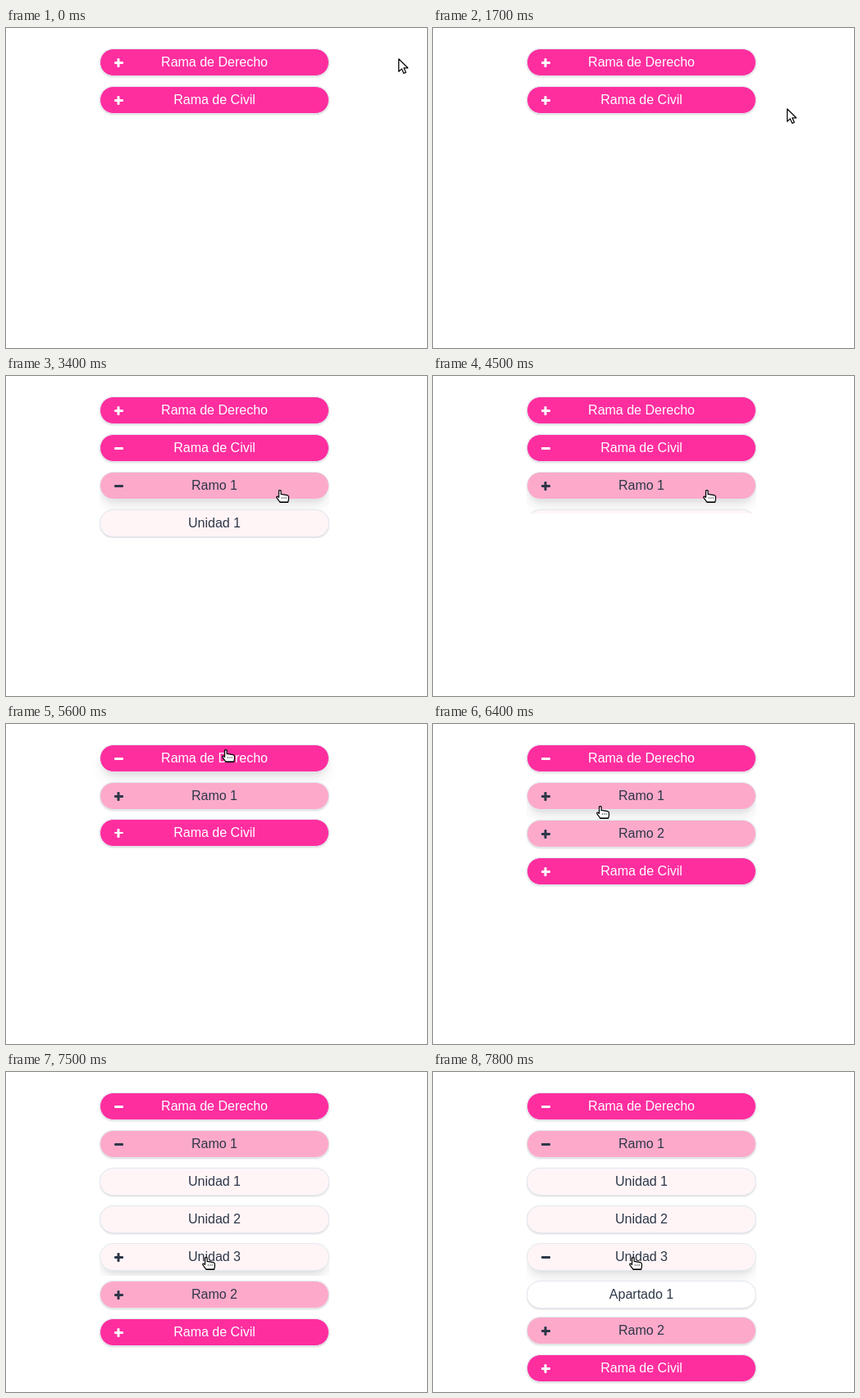
An HTML page that plays this animation: 513 by 391 pixels, repeating every 8000 ms.

```html
<!DOCTYPE html>
<html lang="es">
<head>
<meta charset="utf-8">
<style>
  html, body { margin: 0; width: 100%; height: 100%; overflow: hidden; background: #fff; }
  #menu { position: absolute; left: 114px; top: 19px; width: 280px; }
  .row { height: 46px; padding: 6px 0; box-sizing: border-box; }
  .pill {
    position: relative; height: 34px; box-sizing: border-box;
    border: 1px solid #e2e8f0; border-radius: 17px;
    font: 16px/32px "Liberation Sans", Arial, sans-serif; text-align: center; color: #2d3748;
    box-shadow: 0 1px 3px rgba(0,0,0,.1), 0 1px 2px rgba(0,0,0,.06);
  }
  .pill.hover { box-shadow: 0 10px 15px -3px rgba(0,0,0,.1), 0 4px 6px -2px rgba(0,0,0,.05); }
  .level0 { background: #ff2e9f; color: #fff; }
  .level1 { background: #fdaaca; }
  .level2 { background: #fff5f7; }
  .level3 { background: #fff; }
  .kids { overflow: hidden; }
  .icon::before, .icon::after {
    content: ""; position: absolute; left: 17px; top: 15px;
    width: 10.5px; height: 2.5px; border-radius: 1px; background: currentColor;
  }
  .icon::after { transform: rotate(90deg); }
  .icon.open::after { display: none; }
  svg { position: absolute; left: 0; top: 0; overflow: visible; }
  svg path { fill: #fff; stroke: #000; stroke-width: 1.2; stroke-linejoin: round; }
</style>
</head>
<body>
<div id="menu"></div>
<svg width="16" height="19">
  <path id="arrow" d="M.6 .8V16.2L4.2 12.9 6.8 18.4 9.3 17.2 6.8 11.8H11.7Z"/>
  <g id="hand">
    <path d="M3.5 1.6Q3.5 .6 4.8 .6T6.1 1.6V5.4L13.6 6.6Q15.4 7 15.4 8.6V12L14.6 15.3H5L.8 9.7Q.3 8 2 8.2L3.5 9.4Z"/>
    <path d="M5 15.2H14.6M7.4 9.5V10.5M9.8 9.5V10.5M12.2 9.5V10.5" stroke-width="1"/>
  </g>
</svg>
<script>
const LOOP = 8000, STEP = 100;
const $ = id => document.getElementById(id);

// The screen only refreshes inside these spans.
const spans = [[600, 900], [1700, 2000], [2200, 2400], [2800, 3600],
               [4300, 5100], [5200, 5700], [5900, 6600], [7000, 7800]];

// Pointer moves: start, end, x, y
const moves = [
  [500, 800, 452, 103], [800, 900, 444, 100], [1600, 2000, 356, 89], [2700, 3100, 334, 139],
  [4550, 4750, 300, 94], [5150, 5500, 268, 31], [5800, 6400, 204, 100], [7000, 7500, 244, 226]
];

const item = (label, kids = [], open = Infinity, close = Infinity, span = 300) =>
  ({ label, kids, open, close, span });

const units = () => [
  item("Unidad 1"), item("Unidad 2"),
  item("Unidad 3", [item("Apartado 1")], 7540)
];

const tree = [
  item("Rama de Derecho", [
    item("Ramo 1", units(), 6400, Infinity, 270),
    item("Ramo 2", units())
  ], 5453),
  item("Rama de Civil", [item("Ramo 1", units(), 3290, 4255)], 2150, 4800)
];
// Only the first branch reaches the last level.
tree[1].kids[0].kids[2].open = Infinity;

function add(parent, className, text = "") {
  const el = document.createElement("div");
  el.className = className;
  el.textContent = text;
  return parent.appendChild(el);
}

function build(items, parent, level = 0) {
  for (const it of items) {
    it.pill = add(add(parent, "row"), "pill level" + level, it.label);
    if (!it.kids.length) continue;
    it.icon = add(it.pill, "icon");
    it.box = add(parent, "kids");
    build(it.kids, it.box, level + 1);
  }
}

const ease = (t, start, span) =>
  0.5 - Math.cos(Math.PI * Math.min(1, Math.max(0, (t - start) / span))) / 2;

function shownTime(t) {
  t = Math.floor(t / STEP) * STEP;
  let shown = 0;
  for (const [from, to] of spans) if (t >= from) shown = Math.min(t, to);
  return shown;
}

function pointerAt(t) {
  let x = 478, y = 37;
  for (const [from, to, nx, ny] of moves) {
    const p = ease(t, from, to - from);
    x += (nx - x) * p;
    y += (ny - y) * p;
  }
  return { x, y, over: false };
}

// Lays out one list from `top`, visible down to `limit`, and returns its full height.
function layout(items, t, pointer, top, limit) {
  let y = top;
  for (const it of items) {
    const hover = pointer.x >= 114 && pointer.x < 394 &&
      pointer.y >= y + 6 && pointer.y < Math.min(y + 40, limit);
    it.pill.classList.toggle("hover", hover);
    pointer.over ||= hover;
    y += 46;
    if (!it.box) continue;
    it.icon.classList.toggle("open", t > it.open && t <= it.close);
    const amount = ease(t, it.open, it.span) - ease(t, it.close, it.span);
    const full = layout(it.kids, t, pointer, y, amount ? limit : 0);
    it.box.style.height = full * amount + "px";
    y += full * amount;
  }
  return y - top;
}

function draw(now) {
  const t = shownTime(now % LOOP);
  const pointer = pointerAt(t);
  layout(tree, t, pointer, 19, 391);
  const x = Math.round(pointer.x), y = Math.round(pointer.y);
  $("arrow").style.display = pointer.over ? "none" : "";
  $("hand").style.display = pointer.over ? "" : "none";
  $("arrow").setAttribute("transform", `translate(${x} ${y})`);
  $("hand").setAttribute("transform", `translate(${x - 5} ${y})`);
}

build(tree, $("menu"));
const began = performance.now();
(function tick() {
  draw(performance.now() - began);
  requestAnimationFrame(tick);
})();
</script>
</body>
</html>
```
